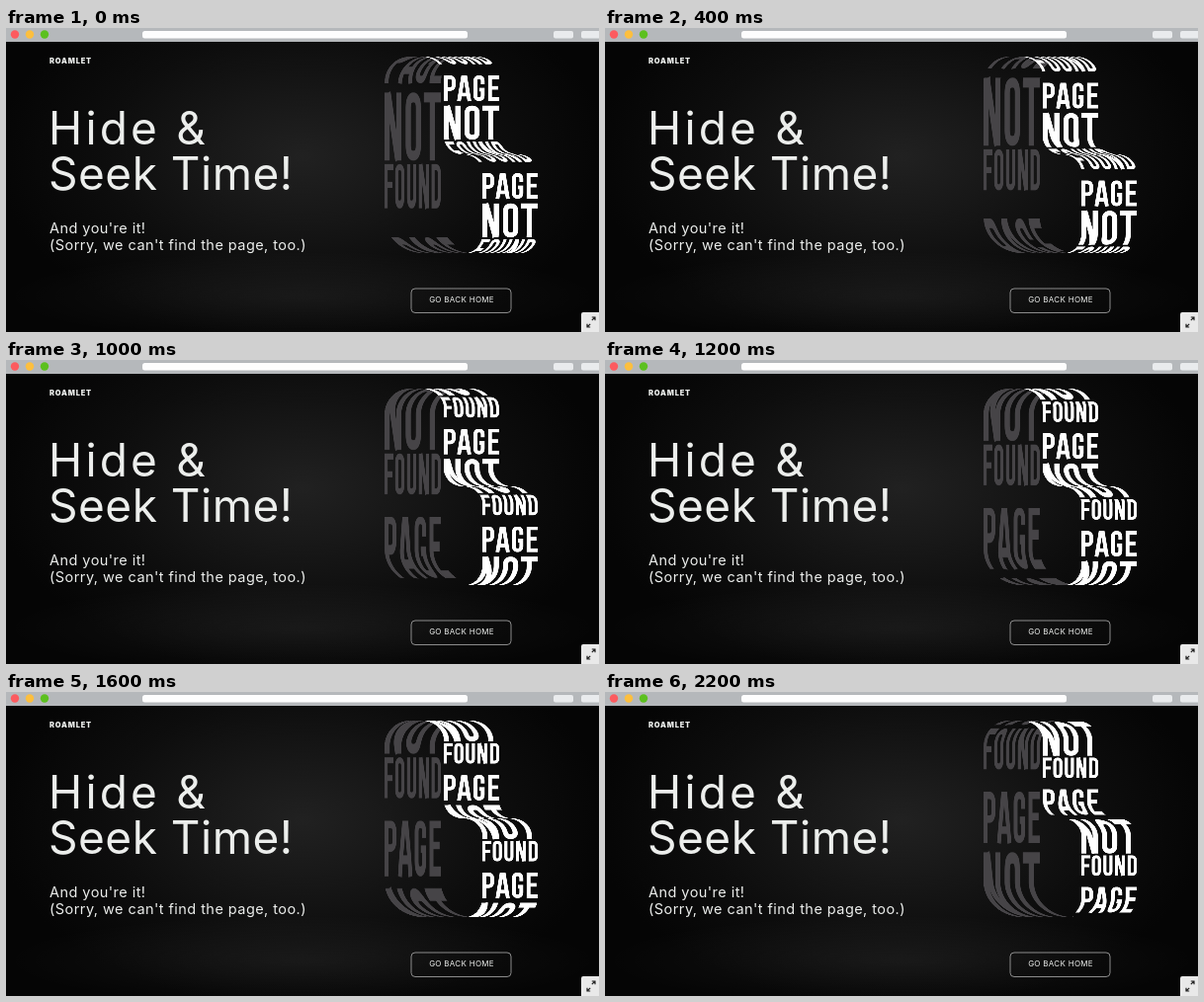
These frames come from a looping animation (600x308 px, 2300 ms). An HTML page with a canvas:

```html
<!DOCTYPE html>
<html lang="en">
<head>
<meta charset="utf-8">
<title>Page not found</title>
<style>
html, body { margin: 0; width: 100%; height: 100%; overflow: hidden; background: #050505; }
svg, canvas { position: absolute; display: block; }
svg { left: 0; top: 0; }
canvas { left: 380px; top: 25px; width: 160px; height: 205px; }
text { font-family: Inter, "Open Sans", sans-serif; fill: #eceeec; }
.head { font-size: 46px; font-weight: 400; }
.sub { font-size: 14.5px; letter-spacing: .45px; }
.logo { font-size: 7.4px; font-weight: 900; letter-spacing: .85px; }
.button { font-size: 8px; letter-spacing: .28px; }
</style>
</head>
<body>
<svg width="600" height="308" viewBox="0 0 600 308">
  <defs>
    <radialGradient id="glow" gradientUnits="userSpaceOnUse" cx="0" cy="0" r="1"
      gradientTransform="translate(300 130) scale(310 190)">
      <stop offset="0" stop-color="#212121"/>
      <stop offset=".3" stop-color="#181818"/>
      <stop offset=".65" stop-color="#0d0d0d"/>
      <stop offset="1" stop-color="#050505"/>
    </radialGradient>
    <radialGradient id="floor">
      <stop offset="0" stop-color="#fff" stop-opacity=".06"/>
      <stop offset="1" stop-color="#fff" stop-opacity="0"/>
    </radialGradient>
  </defs>
  <rect width="600" height="308" fill="url(#glow)"/>
  <ellipse cx="300" cy="272" rx="300" ry="46" fill="url(#floor)"/>

  <rect width="600" height="14" fill="#b5b8bb"/>
  <circle cx="9" cy="6.5" r="4.2" fill="#fc5b5f"/>
  <circle cx="24" cy="6.5" r="4.2" fill="#fdbf3e"/>
  <circle cx="39" cy="6.5" r="4.2" fill="#5cc01f"/>
  <rect x="138" y="3" width="329" height="7.5" rx="2.5" fill="#fdfdfd"/>
  <rect x="554" y="3" width="20" height="7.5" rx="2" fill="#e9ebed"/>
  <rect x="582" y="3" width="22" height="7.5" rx="2" fill="#e9ebed"/>

  <text class="logo" x="44" y="35.7">ROAMLET</text>
  <text class="head" x="43" y="118" letter-spacing="3.2">Hide &amp;</text>
  <text class="head" x="43" y="164" letter-spacing=".5">Seek Time!</text>
  <text class="sub" x="44" y="208">And you're it!</text>
  <text class="sub" x="44" y="224.5">(Sorry, we can't find the page, too.)</text>

  <rect x="410" y="264" width="101" height="24.5" rx="4" fill="none" stroke="#8c8c8c"/>
  <text class="button" x="461" y="278" text-anchor="middle">GO BACK HOME</text>

  <path d="M582 308V290q0-2 2-2H600V308Z" fill="#e9e9e9"/>
  <path d="M592.8 296.2L596 293M592.8 293H596V296.2M591.2 299.8L588 303M588 299.8V303H591.2"
    fill="none" stroke="#222" stroke-width="1.2"/>
</svg>
<canvas id="belt" width="640" height="820"></canvas>

<script>
const RES = 4, LEFT = 380, TOP = 25;   // belt canvas resolution and corner
const PERIOD = 99, WIDTH = 56;         // one repeat of the lettering
const LOOP = 2300, STEP = 100;

// Condensed capitals, 700 units tall: [advance, centre lines]
const glyphs = {
  P: [376, "M96 700V50H190Q299 50 299 160V270Q299 375 190 375H96"],
  A: [405, "M64 705L180 -3M341 705L225 -3M110 525H295"],
  G: [384, "M290 235V160Q290 50 192 50T94 160V540Q94 650 192 650T290 540V390H200"],
  E: [358, "M340 50H96V650H340M96 340H306"],
  N: [412, "M92 700V0M320 700V0M110 0L302 700"],
  O: [388, "M94 160Q94 50 194 50T294 160V540Q294 650 194 650T94 540Z"],
  T: [356, "M10 50H346M178 0V700"],
  F: [344, "M96 700V50H332M96 355H300"],
  U: [388, "M94 0V540Q94 650 194 650T294 540V0"],
  D: [391, "M96 50H190Q297 50 297 160V540Q297 650 190 650H96Z"]
};

// Each word fills the belt width: [word, top, right bearing]
const words = [["PAGE", 0, 18], ["NOT", 30.7, 10], ["FOUND", 67, 40]];
const BEARING = 41, FLATTEN = .97;

function makeTile(color) {
  const tile = document.createElement("canvas");
  tile.width = WIDTH * RES;
  tile.height = PERIOD * RES;
  const c = tile.getContext("2d");
  c.strokeStyle = color;
  c.lineWidth = 103;
  for (const [word, top, right] of words) {
    const advance = [...word].reduce((sum, ch) => sum + glyphs[ch][0], 0);
    const k = WIDTH * RES / (advance - BEARING - right);
    c.setTransform(k, 0, 0, k * FLATTEN, 0, top * RES);
    c.translate(-BEARING, 0);
    for (const ch of word) {
      c.stroke(new Path2D(glyphs[ch][1]));
      c.translate(glyphs[ch][0], 0);
    }
  }
  return tile;
}

const clamp = u => Math.min(1, Math.max(0, u));

// Quarter-round bend: 0 while straight, 1 where the belt lies flat
function bend(u) {
  u = clamp(u);
  return 1 - Math.sqrt(1 - u * u);
}

const frontX = y => 443
  - 22 * bend((49 - y) / 20)
  + 19.5 * (y < 128 ? bend((y - 110) / 18) : 2 - bend((146 - y) / 18))
  - 18 * bend((y - 208) / 20);

const backX = y => 383
  + 25 * bend((55 - y) / 26)
  + 40 * bend((y - 192) / 36);

// The lettering is drawn out where the back enters its lower bend
const backTape = y => (y - 4 - 10 * clamp((y - 168) / 42)) / 2;

const white = makeTile("#fff"), grey = makeTile("#464447");
const ctx = document.getElementById("belt").getContext("2d");

function drawSide(tile, xAt, width, tapeAt, stretch) {
  for (let y = 29; y < 228; y += 1 / RES) {
    const tape = ((tapeAt(y) % PERIOD) + PERIOD) % PERIOD;
    ctx.drawImage(tile, 0, tape * RES, tile.width, 1 / stretch,
      (xAt(y) - LEFT) * RES, (y - TOP) * RES, width * RES, 1);
  }
}

// Belt travel: [step, pixels]
const travel = [[0, 0], [4, 7.5], [6, 17], [10, 21.6], [14, 30.7], [18, 41], [22, 50.5]];

function travelAt(step) {
  const i = Math.max(1, travel.findIndex(key => key[0] >= step));
  const [s0, d0] = travel[i - 1], [s1, d1] = travel[i];
  return d0 + (d1 - d0) * (step - s0) / (s1 - s0);
}

let shown = -1;
function tick() {
  let step = Math.floor(performance.now() % LOOP / STEP);
  if (step === 20) step = 19;   // brief hold
  if (step !== shown) {
    shown = step;
    const d = travelAt(step);
    ctx.clearRect(0, 0, 640, 820);
    drawSide(grey, backX, 57, y => backTape(y) + d, 2);
    drawSide(white, frontX, WIDTH, y => y - 48 - d, 1);
  }
  requestAnimationFrame(tick);
}
tick();
</script>
</body>
</html>
```
